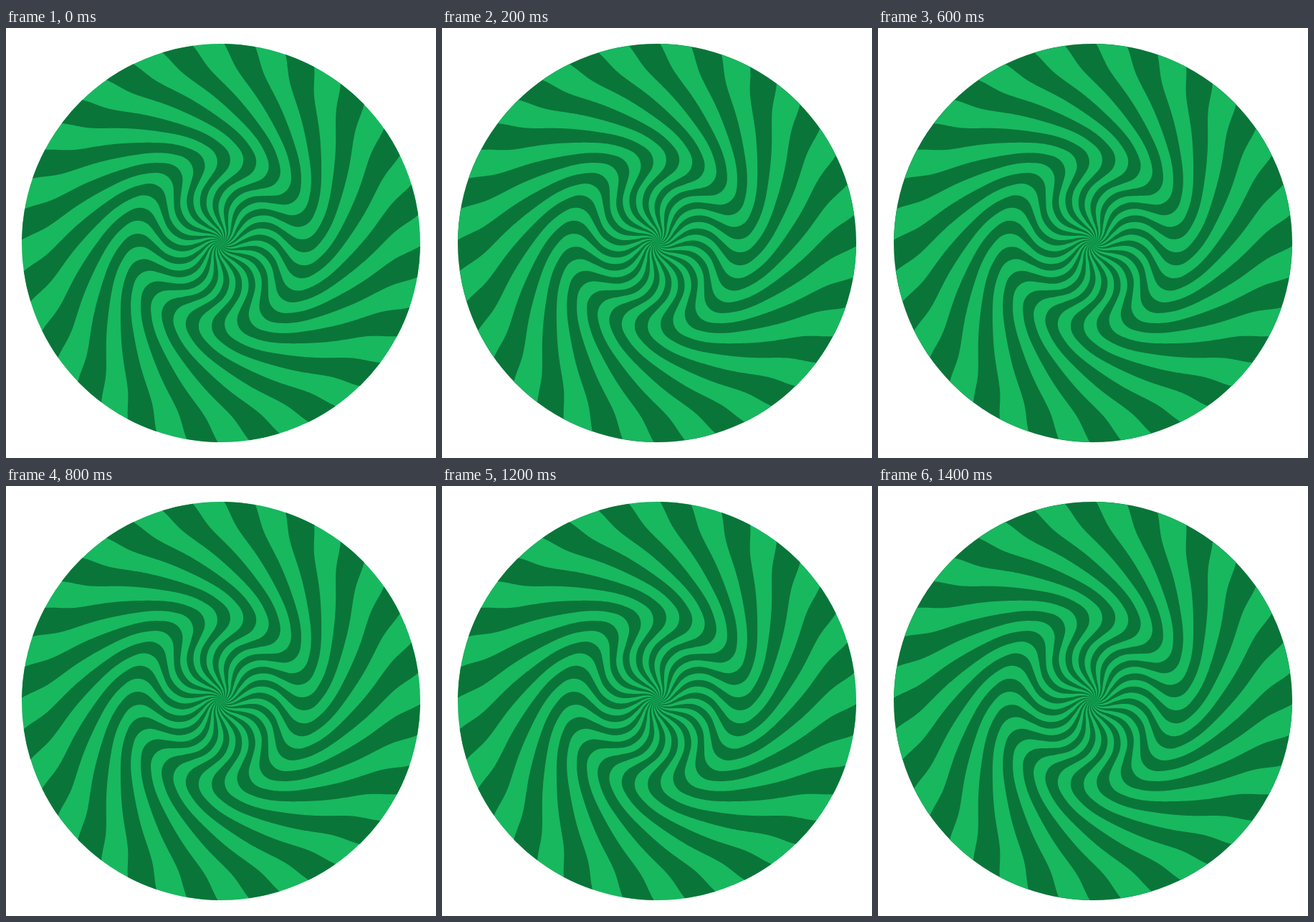
These frames come from a looping animation (600x600 px, 1.6 s). An HTML page with a canvas:

```html
<!DOCTYPE html>
<html lang="en">
<head>
<meta charset="utf-8">
<title>Swirl</title>
<style>
html, body { margin: 0; width: 100%; height: 100%; overflow: hidden; background: #fff; }
canvas { display: block; }
</style>
</head>
<body>
<canvas id="stage" width="600" height="600"></canvas>
<script>
const ctx = document.getElementById('stage').getContext('2d');
const R = 278, STRIPES = 20, STEP = Math.PI / STRIPES, SWAP = 200;
const LIGHT = '#18b85f', DARK = '#0a7539';

// Twist of a stripe edge: radius, degrees clockwise from the top
const knots = [
  [0, 95], [12, 56], [25, 33], [38, 24.5], [50, 23], [62, 26], [76, 33], [90, 43],
  [103, 49.7], [115, 51.4], [128, 49.3], [142, 43], [175, 26.2], [205, 15.2],
  [240, 5.9], [278, 0.9]
];

function slope(i) {
  const a = knots[Math.max(i - 1, 0)], b = knots[Math.min(i + 1, knots.length - 1)];
  return (b[1] - a[1]) / (b[0] - a[0]);
}

// Cubic Hermite interpolation between the knots
function twist(r) {
  let i = 0;
  while (i < knots.length - 2 && r > knots[i + 1][0]) i++;
  const [r0, a0] = knots[i], [r1, a1] = knots[i + 1];
  const h = r1 - r0, u = (r - r0) / h, v = 1 - u;
  const deg = v * v * (1 + 2 * u) * a0 + u * u * (3 - 2 * u) * a1
    + h * u * v * (v * slope(i) - u * slope(i + 1));
  return deg * Math.PI / 180;
}

const edge = [];
for (let r = 0; r <= R; r += 1) edge.push([r, twist(r) - Math.PI / 2]);

const stripes = new Path2D();
for (let k = 0; k < STRIPES; k++) {
  const start = 2 * k * STEP;
  const add = ([r, a], turn) => stripes.lineTo(r * Math.cos(a + turn), r * Math.sin(a + turn));
  stripes.moveTo(0, 0);
  edge.forEach(p => add(p, start));
  const rim = edge[R][1] + start;
  stripes.arc(0, 0, R, rim, rim + STEP);
  for (let i = R; i >= 0; i--) add(edge[i], start + STEP);
  stripes.closePath();
}

function draw(now) {
  const swapped = Math.floor(now / SWAP) % 2;
  ctx.setTransform(1, 0, 0, 1, 300, 300);
  ctx.clearRect(-300, -300, 600, 600);
  ctx.fillStyle = swapped ? DARK : LIGHT;
  ctx.beginPath();
  ctx.arc(0, 0, R, 0, 2 * Math.PI);
  ctx.fill();
  ctx.fillStyle = swapped ? LIGHT : DARK;
  ctx.fill(stripes);
}

function tick() {
  draw(performance.now());
  requestAnimationFrame(tick);
}
tick();
</script>
</body>
</html>
```
